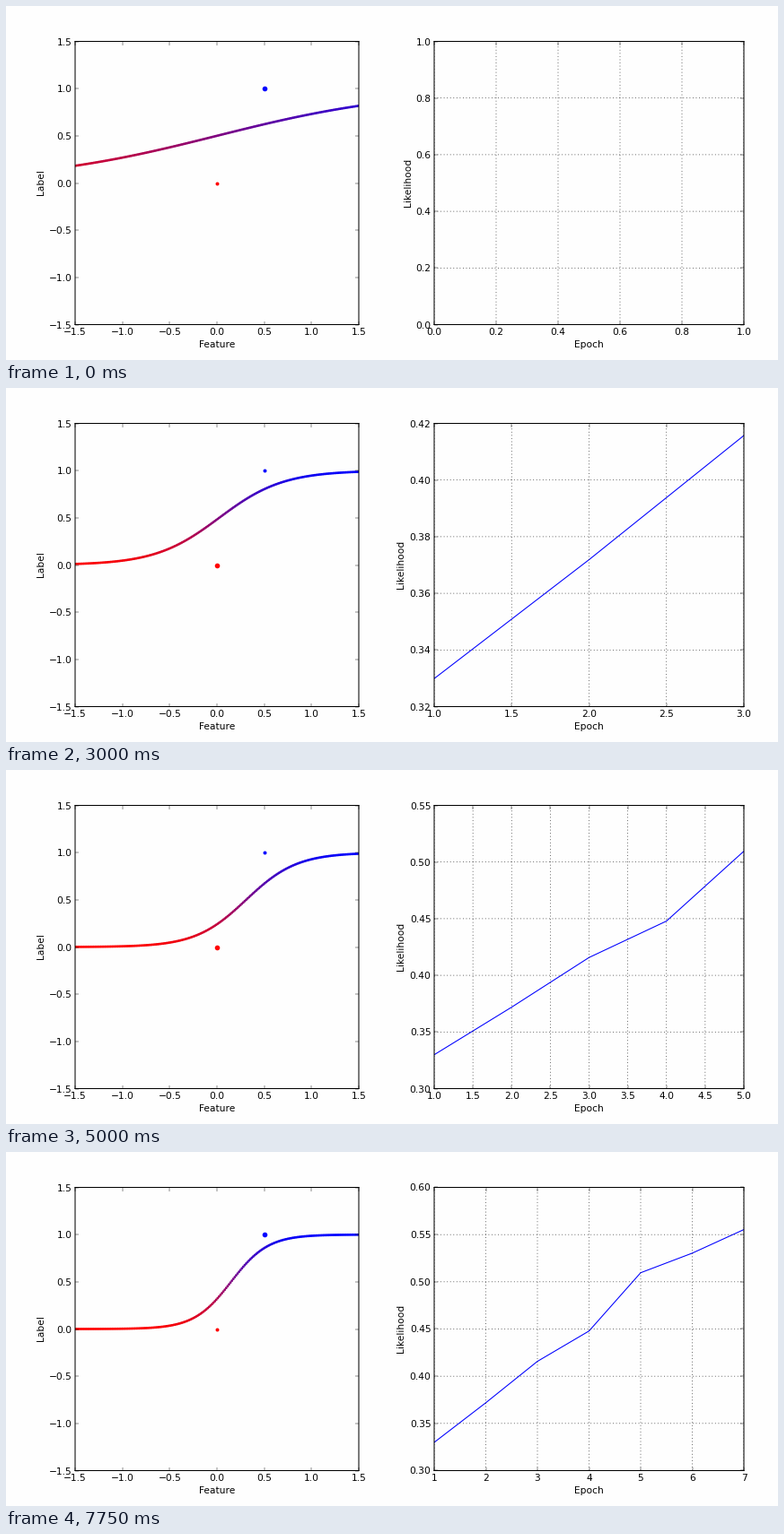
Animation of 860 by 395 pixels, one loop 8000 ms. Source, as a matplotlib script:

```python
import numpy as np
import matplotlib.pyplot as plt
from matplotlib.animation import FuncAnimation

W, H, DPI = 860, 395, 64
BG = "#fefefe"

plt.style.use("classic")
plt.rcParams.update({
    "font.family": "DejaVu Sans",
    "savefig.dpi": "figure",
    "savefig.facecolor": BG,
    "ytick.alignment": "center_baseline",
    "path.snap": False,
    "axes.linewidth": 1.15,
    "grid.linewidth": 0.7,
})

RATE = 2.5
# (feature, label): B is the positive sample, R the negative one
SAMPLES = {"B": (0.5, 1), "R": (0.0, 0)}
ORDERS = ["BR", "BR", "RB", "RB", "BR", "RB", "RB", "RB"]

# epochs done: (x low, x high, x step, y low, y high, y step)
SCALES = {
    0: (0, 1, 0.2, 0, 1, 0.2),
    2: (1, 2.2, 0.2, 0.32, 0.38, 0.01),
    3: (1, 3, 0.5, 0.32, 0.42, 0.02),
    4: (1, 4, 0.5, 0.32, 0.46, 0.02),
    5: (1, 5, 0.5, 0.30, 0.55, 0.05),
    6: (1, 6, 1, 0.30, 0.55, 0.05),
    7: (1, 7, 1, 0.30, 0.60, 0.05),
}


def sigmoid(z):
    return 1 / (1 + np.exp(-z))


def train():
    """Stochastic gradient ascent; two animation steps per sample."""
    w, b = 1.0, 0.0
    steps, scores = [], []
    for epoch, order in enumerate(ORDERS):
        for name in order:
            x, y = SAMPLES[name]
            steps.append((w, b, name, epoch))
            err = y - sigmoid(w * x + b)
            w += RATE * err * x
            b += RATE * err
            steps.append((w, b, name, epoch))
        scores.append(sigmoid(0.5 * w + b) * (1 - sigmoid(b)))
    return steps, scores


STEPS, SCORES = train()

fig = plt.figure(figsize=(W / DPI, H / DPI), dpi=DPI, facecolor=BG)


def panel(left, right):
    box = [left / W, 0.1, (right - left) / W, 0.8]
    return fig.add_axes(box, facecolor=BG)


def caption(x, y, text, rotation=0):
    return fig.text(x / W, 1 - y / H, text, ha="center", va="baseline",
                    rotation=rotation, rotation_mode="anchor", fontsize=12)


def ticks(low, high, step):
    return np.round(np.arange(low, high + step / 2, step), 4)


def labels(values, digits):
    return [f"{v:.{digits}f}" for v in values]


# model panel
model = panel(77, 393)
model.set(xlim=(-1.5, 1.5), ylim=(-1.5, 1.5),
          xticks=ticks(-1.5, 1.5, 0.5), yticks=ticks(-1.5, 1.5, 0.5))
xs = np.linspace(-1.5, 1.5, 200)
curve = model.scatter(xs, xs * 0, s=10, linewidths=0)
dots = {name: model.scatter(*pos, s=20, c=color, linewidths=0)
        for (name, pos), color in zip(SAMPLES.items(), ("blue", "red"))}
caption(235, 381.4, "Feature")
caption(42, 197, "Label", 90)

# likelihood panel
score = panel(477, 822)
score.grid(True)
line, = score.plot([], [], "b-", lw=1.2)
caption(649, 381.4, "Epoch")
score_name = caption(450.5, 197, "Likelihood", 90)


def draw_model(w, b, active):
    p = sigmoid(w * xs + b)
    curve.set_offsets(np.column_stack([xs, p]))
    curve.set_facecolors(np.column_stack([1 - p, 0 * p, p]))
    for name, dot in dots.items():
        dot.set_sizes([40 if name == active else 20])


def draw_score(done):
    # a line needs at least two epochs
    n = done if done > 1 else 0
    x0, x1, dx, y0, y1, dy = SCALES[n]
    xt, yt = ticks(x0, x1, dx), ticks(y0, y1, dy)
    score.set_xticks(xt, labels(xt, 0 if dx == 1 else 1))
    score.set_yticks(yt, labels(yt, 2 if n else 1))
    score.set_xlim(x0, x1)
    score.set_ylim(y0, y1)
    line.set_data(np.arange(1, n + 1), SCORES[:n])
    score_name.set_x((443 if n else 450.5) / W)


def update(i):
    w, b, active, done = STEPS[i]
    draw_model(w, b, active)
    draw_score(done)
    return []


anim = FuncAnimation(fig, update, frames=len(STEPS), interval=250,
                     init_func=lambda: update(0), repeat=True,
                     repeat_delay=0, blit=False)
plt.show()
```
